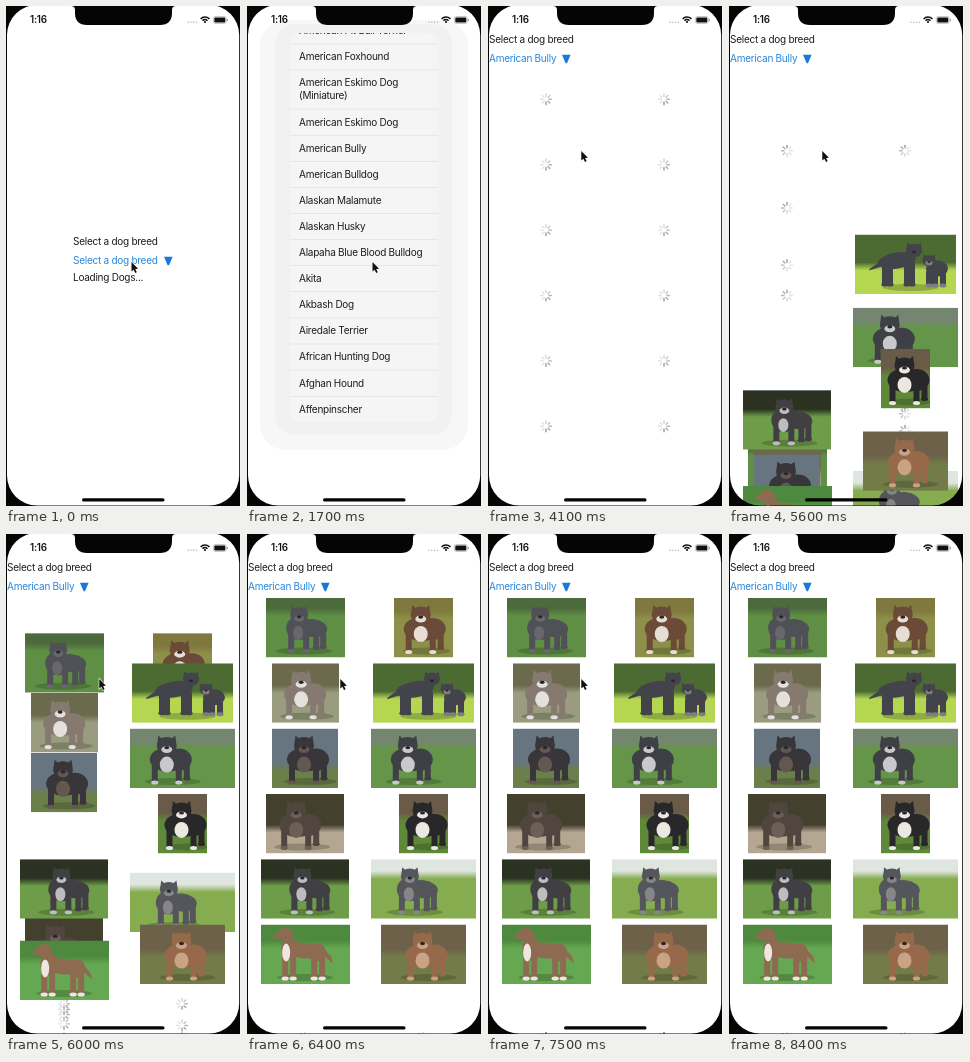
Animation, 235 px wide and 500 px high, one loop 8500 ms. Source, as an HTML page with a canvas:

```html
<!DOCTYPE html>
<html lang="en">
<head>
<meta charset="utf-8">
<title>Dog breed picker</title>
<style>
html, body { margin: 0; width: 100%; height: 100%; overflow: hidden; background: #fff; }
canvas { display: block; width: 235px; height: 500px; }
</style>
</head>
<body>
<canvas id="stage"></canvas>
<script>
const W = 235, H = 500, LOOP = 8500;
const canvas = document.getElementById('stage');
const ctx = canvas.getContext('2d');
const dpr = window.devicePixelRatio || 1;
canvas.width = W * dpr;
canvas.height = H * dpr;

const FONT = 'Inter, Roboto, sans-serif';
const GRID_AT = 4100;
const CURSOR_HIDE = 7700;
const SLIDE = 686;
const PHOTO_H = 59.5;

// Bottom row first.
const breeds = ['Affenpinscher', 'Afghan Hound', 'African Hunting Dog', 'Airedale Terrier',
  'Akbash Dog', 'Akita', 'Alapaha Blue Blood Bulldog', 'Alaskan Husky', 'Alaskan Malamute',
  'American Bulldog', 'American Bully', 'American Eskimo Dog',
  'American Eskimo Dog|(Miniature)', 'American Foxhound', 'American Pit Bull Terrier'];

// x, width, load time, backdrop, horizon, ground, coat, chest, pose, dog position
const photos = [
  [19, 79, 5443, '#4d6a3c', .25, '#5f8f45', '#505156', '#68686c', 'stand', .42],
  [147, 59, 5443, '#80793f', .3, '#8d9048', '#6b4a38', '#e6ddd4', 'front', .47],
  [25, 67, 5443, '#6b6a4c', .45, '#9a9c80', '#857970', '#e4e0dc', 'front', .45],
  [126, 101, 5158, '#4c6b33', .55, '#b4d651', '#43444b', '#7e7e82', 'pair', .5],
  [25, 66, 5443, '#66757f', .65, '#6a7f49', '#38363a', '#625850', 'front', .5],
  [124, 105, 5200, '#748670', .3, '#649549', '#3f3f46', '#c9c9cc', 'front', .36],
  [19, 78, 5679, '#43402e', .6, '#b5a692', '#51463f', '#6d5f56', 'front', .4],
  [152, 49, 5200, '#6a5a48', .4, '#5f8838', '#282729', '#ece7e1', 'front', .5],
  [14, 88, 5200, '#2b3222', .4, '#6d9d48', '#413f43', '#bdbdbf', 'stand', .47],
  [124, 105, 5443, '#dfe5df', .28, '#85ad50', '#55565c', '#86868a', 'stand', .37],
  [14, 89, 5500, '#4d8a3f', .35, '#66a752', '#8e6b50', '#eee6df', 'side', .44],
  [134, 85, 5200, '#6d6249', .5, '#737c49', '#96694a', '#c9a384', 'front', .5]
];

const clamp = v => Math.max(0, Math.min(1, v));
const mix = (a, b, p) => a + (b - a) * p;
const ease = v => (1 - Math.cos(Math.PI * clamp(v))) / 2;

function rect(x, y, w, h, color) {
  ctx.fillStyle = color;
  ctx.fillRect(x, y, w, h);
}

function round(x, y, w, h, r, color) {
  ctx.beginPath();
  ctx.roundRect(x, y, w, h, r);
  ctx.fillStyle = color;
  ctx.fill();
}

function oval(x, y, rx, ry, color, turn = 0) {
  ctx.beginPath();
  ctx.ellipse(x, y, rx, ry, turn, 0, Math.PI * 2);
  ctx.fillStyle = color;
  ctx.fill();
}

function poly(points, color) {
  ctx.beginPath();
  points.forEach(([x, y]) => ctx.lineTo(x, y));
  ctx.closePath();
  ctx.fillStyle = color;
  ctx.fill();
}

// Text centred vertically on y.
function text(str, x, y, color = '#1c1c1c', size = 10, weight = 400) {
  ctx.font = `${weight} ${size}px ${FONT}`;
  ctx.letterSpacing = '-0.26px';
  ctx.fillStyle = color;
  ctx.fillText(str, x, y + size * .34);
}

function heading(x, y, choice, arrowX, alpha) {
  text('Select a dog breed', x, y);
  ctx.globalAlpha = alpha;
  text(choice, x, y + 19, '#2787dc');
  const top = y + 14.8;
  poly([[arrowX, top], [arrowX + 8.6, top], [arrowX + 5, top + 8.4], [arrowX + 3.6, top + 8.4]], '#1878d8');
  ctx.globalAlpha = 1;
}

function intro(t) {
  if (t < 2000) {
    const alpha = t < 270 ? 1 : t < 420 ? .5 : t < 600 ? .25 : 1;
    heading(67, 236, 'Select a dog breed', 158, alpha);
    text('Loading Dogs...', 67, 272);
  } else {
    heading(74, 236, 'American Bully', 147, 1);
    text('Loading Dogs...', 74, 272);
  }
}

function picker(alpha) {
  if (alpha <= 0) return;
  ctx.save();
  ctx.globalAlpha = alpha;
  round(13, 14, 208, 430, 26, '#f7f7f7');
  round(28, 18, 177, 411, 20, '#f1f1f1');
  round(43, 27, 148.5, 389, 9, '#f5f5f5');
  ctx.beginPath();
  ctx.roundRect(43, 27, 148.5, 389, 9);
  ctx.clip();
  let bottom = 416.3;
  for (const name of breeds) {
    const lines = name.split('|');
    const height = 26.1 + (lines.length - 1) * 13;
    lines.forEach((line, i) => text(line, 52, bottom - height + 13 + i * 13));
    bottom -= height;
    rect(43, bottom - .3, 149, .6, '#dcdcdc');
  }
  ctx.restore();
}

function spinner(x, y, t) {
  const lead = Math.floor(t / 125) + 2;
  ctx.lineWidth = 1.4;
  ctx.lineCap = 'round';
  for (let i = 0; i < 8; i++) {
    const a = i * Math.PI / 4;
    const age = ((lead - i) % 8 + 8) % 8;
    const tone = 155 + Math.min(age, 5) * 14;
    ctx.strokeStyle = `rgb(${tone},${tone},${tone})`;
    ctx.beginPath();
    ctx.moveTo(x + Math.cos(a) * 2.9, y + Math.sin(a) * 2.9);
    ctx.lineTo(x + Math.cos(a) * 5.4, y + Math.sin(a) * 5.4);
    ctx.stroke();
  }
}

function head(x, y, r, coat, chest) {
  for (const s of [-1, 1]) {
    poly([[x + s * r * .4, y - r * .6], [x + s * r * .85, y - r], [x + s * r * .95, y - r * .2]], coat);
  }
  oval(x, y, r, r * .85, coat);
  oval(x, y + r * .4, r * .55, r * .35, chest);
  oval(x, y + r * .2, r * .25, r * .17, '#29262a');
}

function leg(x, y, foot, coat, chest) {
  round(x - 3, y, 6, foot - y, 3, coat);
  oval(x, foot - 1, 3.6, 2, chest);
}

// Broad-chested dog seen from the front, hindquarters to the right.
function frontDog(x, coat, chest) {
  oval(x + 11, 31, 13, 11, coat);
  leg(x + 19, 33, 51, coat, coat);
  oval(x, 31, 18, 12, coat);
  leg(x - 13, 30, 55, coat, chest);
  leg(x + 11, 30, 55, coat, chest);
  oval(x - 1, 36, 7, 8, chest);
  head(x - 1, 17, 10, coat, chest);
}

function standDog(x, coat, chest) {
  oval(x + 13, 30, 15, 9, coat, .1);
  leg(x + 17, 33, 51, coat, coat);
  leg(x + 24, 31, 50, coat, coat);
  oval(x, 30, 13, 12, coat);
  leg(x - 8, 30, 54, coat, chest);
  leg(x + 7, 30, 54, coat, chest);
  oval(x - 1, 35, 5, 7, chest);
  head(x, 17, 9, coat, chest);
}

function sideDog(x, coat, chest) {
  oval(x + 4, 26, 20, 8, coat, .06);
  oval(x - 10, 24, 9, 11, coat);
  oval(x + 18, 28, 8, 9, coat);
  [-15, -7, 14, 22].forEach(dx => leg(x + dx, 28, 55, coat, chest));
  poly([[x + 22, 22], [x + 31, 32], [x + 33, 39], [x + 21, 29]], coat);
  oval(x - 14, 28, 4, 9, chest);
  oval(x - 15, 10, 8, 6.5, coat);
  round(x - 26, 9, 12, 6, 3, coat);
}

function pairDogs(coat, chest) {
  oval(42, 26, 19, 8, coat, -.15);
  [30, 35, 52, 57].forEach(x => leg(x, 27, 51, coat, coat));
  poly([[28, 25], [15, 34], [14, 36], [30, 31]], coat);
  head(59, 16, 8, coat, coat);
  oval(82, 34, 11, 8, coat);
  [74, 80, 88].forEach(x => leg(x, 35, 52, coat, chest));
  head(74, 26, 6.5, coat, chest);
}

const poses = { front: frontDog, stand: standDog, side: sideDog };

function photo([x, w, , back, horizon, ground, coat, chest, pose, place], y) {
  ctx.save();
  ctx.translate(x, y);
  ctx.beginPath();
  ctx.rect(0, 0, w, PHOTO_H);
  ctx.clip();
  const sky = ctx.createLinearGradient(0, 0, 0, PHOTO_H);
  sky.addColorStop(0, back);
  sky.addColorStop(horizon - .08, back);
  sky.addColorStop(horizon + .05, ground);
  sky.addColorStop(1, ground);
  rect(0, 0, w, PHOTO_H, sky);
  const cx = w * place;
  oval(cx + 5, 53, Math.min(w * .4, 28), 3.5, 'rgba(35,45,20,.25)');
  if (pose === 'pair') pairDogs(coat, chest);
  else poses[pose](cx, coat, chest);
  ctx.restore();
}

function grid(t) {
  heading(1, 34, 'American Bully', 74, 1);
  const part = p => ease((t - p[2]) / SLIDE);
  photos.forEach((p, i) => {
    spinner(i % 2 ? 176 : 58, mix(93.3 + (i >> 1) * 65.4, 504, part(p)), t);
  });
  photos.forEach((p, i) => {
    if (t >= p[2]) photo(p, mix(485, 64 + (i >> 1) * 65.3, part(p)));
  });
}

function cursor(t) {
  if (t >= CURSOR_HIDE) return;
  let x = 125.5, y = 256;
  if (t > 1800) {
    const a = ease((t - 1800) / 300), b = ease((t - 2100) / 300);
    x = mix(mix(x, 105, a), 93.3, b);
    y = mix(mix(y, 232, a), 145, b);
  }
  const shape = [[0, 0], [0, 9.6], [2.1, 7.7], [3.7, 11], [5.3, 10.2], [3.8, 7.1], [6.6, 6.8]];
  ctx.beginPath();
  shape.forEach(([dx, dy]) => ctx.lineTo(x + dx, y + dy));
  ctx.closePath();
  ctx.lineWidth = 1.2;
  ctx.strokeStyle = '#fff';
  ctx.stroke();
  ctx.fillStyle = '#111';
  ctx.fill();
}

function statusBar() {
  text('1:16', 24, 14, '#111', 9.8, 600);
  for (let i = 0; i < 4; i++) oval(182 + i * 2.8, 16.3, .75, .75, '#b5b5b5');
  ctx.strokeStyle = '#111';
  ctx.lineCap = 'butt';
  ctx.lineWidth = 1.5;
  for (const r of [3.4, 6]) {
    ctx.beginPath();
    ctx.arc(199, 17, r, -Math.PI * .76, -Math.PI * .24);
    ctx.stroke();
  }
  oval(199, 16, 1.1, 1.1, '#111');
  ctx.lineWidth = .6;
  ctx.strokeStyle = '#999';
  ctx.beginPath();
  ctx.roundRect(207.3, 10.6, 13, 6.8, 2);
  ctx.stroke();
  round(208.3, 11.5, 11, 5, 1.2, '#111');
  rect(221, 13, .9, 2.2, '#999');
}

function phone() {
  ctx.beginPath();
  ctx.rect(0, 0, W, H);
  ctx.roundRect(1, -1, 232.2, 500.5, 30);
  ctx.fillStyle = '#050505';
  ctx.fill('evenodd');
  ctx.beginPath();
  ctx.moveTo(65, 0);
  ctx.quadraticCurveTo(69, 0, 69, 4);
  ctx.lineTo(69, 7);
  ctx.quadraticCurveTo(69, 19, 81, 19);
  ctx.lineTo(154, 19);
  ctx.quadraticCurveTo(166, 19, 166, 7);
  ctx.lineTo(166, 4);
  ctx.quadraticCurveTo(166, 0, 170, 0);
  ctx.fill();
  round(76, 492.3, 82.5, 3.2, 1.6, '#050505');
  rect(234, 0, 1, H, '#f4f4f4');
}

function draw(t) {
  ctx.setTransform(dpr, 0, 0, dpr, 0, 0);
  rect(0, 0, W, H, '#fff');
  if (t < GRID_AT) {
    intro(t);
    picker(Math.min(clamp((t - 1250) / 350), 1 - clamp((t - 2650) / 400)));
  } else {
    grid(t);
  }
  statusBar();
  phone();
  cursor(t);
}

const start = performance.now();
function tick() {
  draw((performance.now() - start) % LOOP);
  requestAnimationFrame(tick);
}
tick();
</script>
</body>
</html>
```
